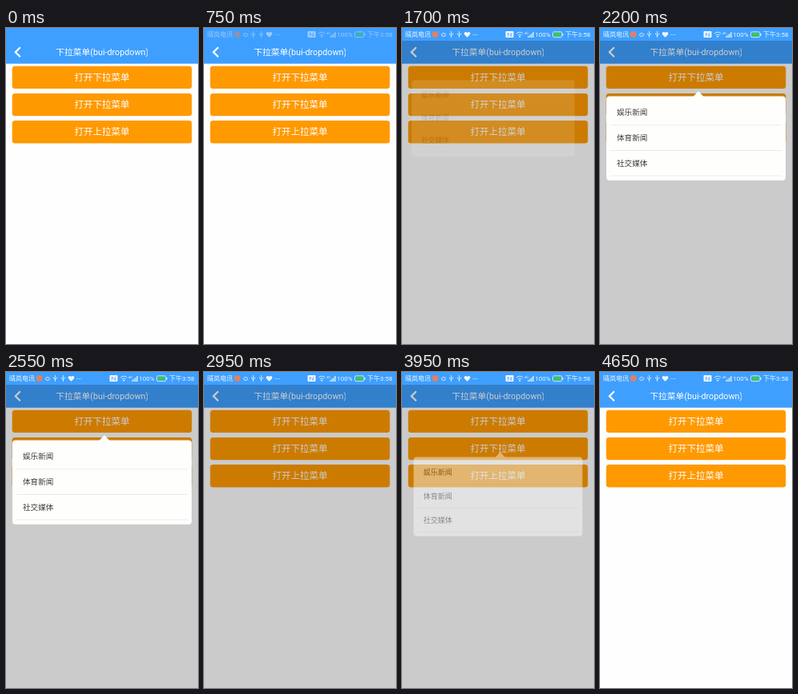
Write an HTML page that moves like this. It is 240 by 396 pixels and loops after 4.7 s.

```html
<!DOCTYPE html>
<html lang="zh-CN">
<meta charset="utf-8">
<style>
  html, body { margin: 0; height: 100%; overflow: hidden; background: #fefefe; }
  svg { display: block; width: 240px; height: 396px; font-family: Roboto, "Noto Sans CJK SC", "Noto Sans CJK", sans-serif; }
  .line { fill: none; stroke: #fff; stroke-width: .8; }
  .button rect { fill: #ff9900; }
  .button text { fill: #fff; font-size: 11.5px; text-anchor: middle; }
  #menu text { fill: #3a3a3a; font-size: 9.6px; }
  #menu line { stroke: #e6e6e6; stroke-width: .8; }
</style>
<svg viewBox="0 0 240 396">
  <clipPath id="titleBox"><rect x="60" y="16" width="117" height="28"/></clipPath>
  <rect width="240" height="396" fill="#fefefe"/>
  <rect width="240" height="44.7" fill="#3f9fff"/>
  <path d="M17.8 24.2L11.8 30.2L17.8 36.2" class="line" style="stroke-width:2.2"/>
  <text x="62.3" y="33.8" font-size="10.75" fill="#fff" clip-path="url(#titleBox)">下拉菜单(bui-dropdown)</text>
  <g id="buttons"></g>
  <rect id="dim" y="16" width="240" height="380" fill-opacity=".2"/>
  <g id="menu">
    <path d="M116.5 86L123 79L129.5 86Z" fill="#fefffd"/>
    <rect x="8" y="85.6" width="224" height="105.4" rx="4" fill="#fefffd"/>
    <g id="items"></g>
  </g>
  <g id="status" fill="#fff" font-size="8">
    <text x="4" y="11">晴岚电讯</text>
    <circle cx="41.5" cy="8" r="4" fill="#e8805c"/>
    <ellipse cx="52" cy="8.5" rx="2.6" ry="1.9" class="line"/>
    <g id="usb" class="line"><path d="M61.5 4V12M59.5 6.5V8L61.5 9.5L63.5 8V6.5"/></g>
    <use href="#usb" x="10"/>
    <path d="M81.5 11.8L78 8.2A1.9 1.9 0 0 1 81.5 6A1.9 1.9 0 0 1 85 8.2Z"/>
    <path d="M88.5 8.5H94.5" class="line" stroke-dasharray="1.2"/>
    <rect x="129.5" y="4" width="10" height="8" rx="1"/>
    <path d="M132.5 10.5V6L136.5 10.5V6" class="line" style="stroke:#3f9fff"/>
    <path d="M143 7Q147.2 3.4 151.4 7M144.7 9Q147.2 6.8 149.7 9" class="line"/>
    <circle cx="147.2" cy="10.8" r="1"/>
    <text x="153" y="7.5" font-size="4">4G</text>
    <path d="M158 12V10M160 12V8.5M162 12V7M164 12V5" class="line" style="stroke-width:1.2"/>
    <text x="166.3" y="11">100%</text>
    <rect x="188.5" y="4.8" width="11.5" height="6.8" rx="1.8" class="line"/>
    <rect x="189.7" y="6" width="9" height="4.4" rx="1" fill="#3ccc3c"/>
    <path d="M200.3 7H201.5V9.5H200.3Z"/>
    <text x="204" y="11">下午3:58</text>
  </g>
</svg>
<script>
  const LOOP = 4700;
  const $ = id => document.getElementById(id);
  const ramp = (t, from, to) => Math.min(1, Math.max(0, (t - from) / (to - from)));

  // Each visit: backdrop on/off, opening and closing start, and vertical offset of the menu.
  const visits = [
    { on: 1600, open: 1675, close: 2750, off: 3000, y: 0 },
    { on: 3250, open: 3300, close: 3840, off: 4150, y: 34 },
  ];
  const FADE = 200;

  $('buttons').innerHTML = ['打开下拉菜单', '打开下拉菜单', '打开上拉菜单'].map((label, i) =>
    `<g class="button" transform="translate(0 ${34.2 * i})">
      <rect x="7.7" y="47.7" width="224.6" height="28.4" rx="3.5"/><text x="120" y="66">${label}</text></g>`).join('');
  $('items').innerHTML = ['娱乐新闻', '体育新闻', '社交媒体'].map((label, i) => {
    const y = 106 + 31.7 * i;
    return `<text x="21" y="${y + 3.3}">${label}</text>
      <line x1="13" x2="227" y1="${y + 15.8}" y2="${y + 15.8}"/>`;
  }).join('');

  // A hidden menu is smaller, higher and transparent; opening also drifts in from the left.
  function placeMenu(shown, y, drift) {
    const hidden = 1 - shown;
    $('menu').setAttribute('opacity', shown);
    $('menu').setAttribute('transform',
      `translate(${120 - drift * hidden} ${138.5 + y - 29 * hidden}) scale(${1 - .105 * hidden}) translate(-120 -138.5)`);
  }

  function draw(t) {
    $('status').setAttribute('opacity', .92 * ramp(t, 450, 1050));
    const visit = visits.find(v => t >= v.on && t < v.off);
    $('dim').setAttribute('visibility', visit ? 'visible' : 'hidden');
    if (!visit) return placeMenu(0, 0, 0);
    const closing = t >= visit.close;
    const shown = closing
      ? 1 - ramp(t, visit.close, visit.close + FADE)
      : ramp(t, visit.open, visit.open + FADE);
    placeMenu(shown, visit.y, closing ? 0 : 7);
  }

  function tick() {
    draw(performance.now() % LOOP);
    requestAnimationFrame(tick);
  }
  tick();
</script>
</html>
```
